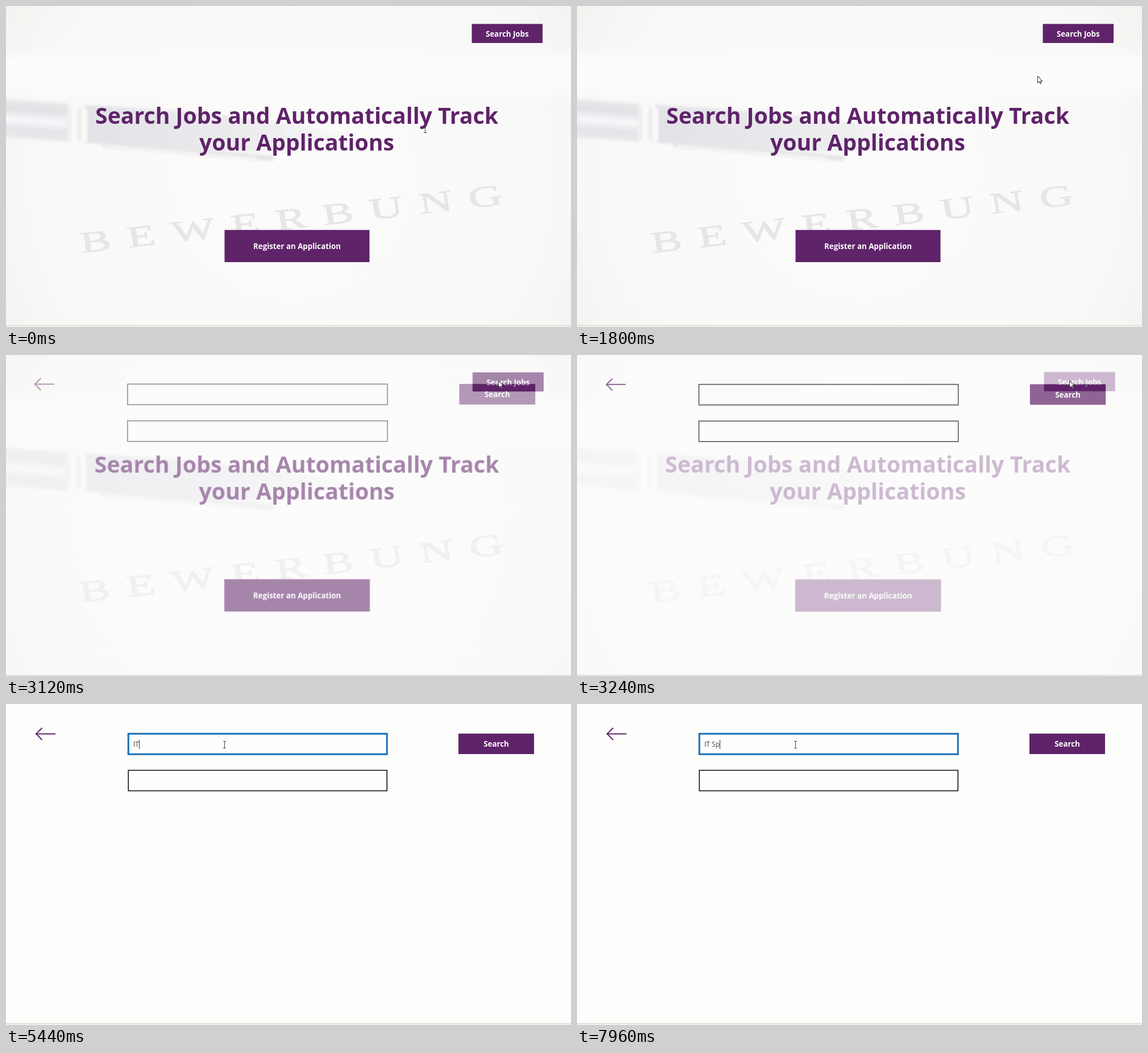
Animation of 994x564 px, one loop 8 s. Source, as an HTML page with a canvas:

```html
<!DOCTYPE html>
<html lang="en">
<head>
<meta charset="utf-8">
<title>Job search</title>
<style>
html, body { margin: 0; width: 100%; height: 100%; overflow: hidden; background: #fdfdfc; }
canvas { display: block; width: 100vw; height: 100vh; }
</style>
</head>
<body>
<canvas id="stage" width="994" height="564"></canvas>
<script>
const W = 994, H = 564, LOOP = 8000;
const PURPLE = '#5f2369', SANS = '"Open Sans", "Noto Sans", sans-serif';
const CLICK = 4160, STROKES = 'IT Sep<<p'; // "<" deletes one letter
const stage = document.getElementById('stage').getContext('2d');

// pointer moves: start, duration, shift in x and y
const MOVES = [
  [80, 800, -332, 57], [1000, 760, 405, -150], [1900, 400, 56, -78],
  [3420, 340, -461, 19], [3800, 320, -21, 7]
];

const clamp = v => Math.max(0, Math.min(1, v));
const ease = v => { const u = clamp(v); return u * u * (3 - 2 * u); };

function write(c, str, x, y, size, color, weight, align = 'center') {
  c.font = `${weight} ${size}px ${SANS}`;
  c.textAlign = align;
  c.fillStyle = color;
  c.fillText(str, x, y);
}

function rect(c, color, x, y, w, h) {
  c.fillStyle = color;
  c.fillRect(x, y, w, h);
}

function button(c, label, x, y, w, h) {
  rect(c, PURPLE, x, y, w, h);
  write(c, label, x + w / 2, y + h / 2 + 5.3, 13.3, '#fff', 700);
}

function fade(c, x0, y0, x1, y1, ...colors) {
  const g = c.createLinearGradient(x0, y0, x1, y1);
  colors.forEach((color, i) => g.addColorStop(i / (colors.length - 1), color));
  return g;
}

function line(c, color, width, ...points) {
  c.strokeStyle = color;
  c.lineWidth = width;
  c.beginPath();
  for (let i = 0; i < points.length; i += 2) c.lineTo(points[i], points[i + 1]);
  c.stroke();
}

function bottomEdge(c) {
  rect(c, '#efefeb', 0, 560, W, 4);
  rect(c, '#dfdfd9', 0, 561, W, 1);
}

// Blurred pen; the skew makes its axis horizontal.
function pen(c) {
  c.save();
  c.transform(1, .07, 0, 1, 0, 198);
  c.filter = 'blur(2px)';
  rect(c, fade(c, 0, -34, 0, 34, '#e8e8e9', '#e2e2e6', '#f8f8fb', '#e4e4e9', '#ebebed'), -10, -34, 120, 67);
  c.fillStyle = fade(c, 140, 0, 650, 0, '#e3e3e7', '#e8e8ec', '#efeff1', 'rgba(246,246,247,0)');
  c.beginPath();
  c.moveTo(138, -34);
  c.quadraticCurveTo(500, -40, 650, -6);
  c.quadraticCurveTo(500, 40, 138, 32);
  c.fill();
  for (let i = 0; i < 4; i++) rect(c, i % 2 ? '#fafaf9' : '#eeeeec', 107 + 9 * i, -28, 9, 58);
  line(c, '#e6e6e7', 10, 170, 33, 470, 37);
  line(c, '#f8f8f5', 4, 175, 36, 440, 40);
  c.restore();
}

function makeHome() {
  const canvas = document.createElement('canvas');
  canvas.width = W;
  canvas.height = H;
  const c = canvas.getContext('2d');
  const glow = c.createRadialGradient(500, 300, 120, 500, 300, 620);
  glow.addColorStop(0, '#fbfbfa');
  glow.addColorStop(.7, '#f8f8f7');
  glow.addColorStop(1, '#f1f1ee');
  rect(c, glow, 0, 0, W, H);
  rect(c, fade(c, 0, 70, 0, 170, 'rgba(252,252,251,0)', '#fcfcfb', '#fcfcfb', 'rgba(252,252,251,0)'), 0, 70, W, 100);
  pen(c);

  c.save();
  c.transform(1.56, -.179, .16, 1, 133, 434);
  c.font = '52px "Liberation Serif", serif';
  c.letterSpacing = '18.3px';
  c.fillStyle = c.strokeStyle = '#e6e6e5';
  c.fillText('BEWERBUNG', 0, 0);
  c.strokeText('BEWERBUNG', 0, 0);
  c.restore();

  bottomEdge(c);
  write(c, 'Search Jobs and Automatically Track', 511.5, 207, 39.2, PURPLE, 700);
  write(c, 'your Applications', 511.5, 254, 39.2, PURPLE, 700);
  button(c, 'Search Jobs', 819.5, 31.5, 124.5, 33.5);
  button(c, 'Register an Application', 384.5, 393.5, 255, 56.5);
  return canvas;
}

function field(c, y, color, width) {
  c.strokeStyle = color;
  c.lineWidth = width;
  c.strokeRect(215.25, y, 455, 36);
}

// An even slowing-down run of keys, then a quick correction.
const strokeTime = i => i < 5 ? 4960 + 1240 * (i / 4) ** .7 : 7600 + 120 * (i - 5);

function typed(t) {
  let str = '', since = CLICK;
  [...STROKES].forEach((key, i) => {
    if (t < strokeTime(i)) return;
    str = key === '<' ? str.slice(0, -1) : str + key;
    since = strokeTime(i);
  });
  return { str, since };
}

function drawForm(c, t, p) {
  rect(c, '#fdfdfc', 0, 0, W, H);
  bottomEdge(c);
  line(c, PURPLE, 2, 52, 52.5, 87, 52.5);
  line(c, PURPLE, 2, 63.5, 42, 53, 52.5, 63.5, 63);
  button(c, 'Search', 796, 52, 133, 36);

  const focused = t >= CLICK;
  field(c, 52.25, focused ? '#1a6fb5' : overField(p) ? '#2e78b8' : '#111', focused ? 3 : 1.6);
  field(c, 116.5, '#111', 1.6);
  if (!focused) return;
  const { str, since } = typed(t);
  write(c, str, 224, 75, 12, '#444', 400, 'left');
  if ((t - since) % 1000 < 500) rect(c, '#333', Math.round(224 + c.measureText(str).width), 63, 1, 16);
}

function pointerAt(t) {
  const p = { x: 737, y: 216 };
  for (const [start, duration, dx, dy] of MOVES) {
    const e = ease((t - start) / duration);
    p.x += dx * e;
    p.y += dy * e;
  }
  return p;
}

const inside = (p, x0, y0, x1, y1) => p.x > x0 && p.x < x1 && p.y > y0 && p.y < y1;
const overField = p => inside(p, 215, 52, 670, 88);
const overTitle = p => inside(p, 150, 168, 872, 268);

function drawPointer(c, p, beam) {
  c.save();
  c.translate(Math.round(p.x), Math.round(p.y));
  if (beam) {
    line(c, '#444', 1, .5, -5, .5, 6);
    for (const y of [-5.5, 6.5]) line(c, '#444', 1, -2, y, 3, y);
  } else {
    line(c, '#333', 1, .5, 0, .5, 12, 3.2, 9.6, 5, 13.6, 6.8, 12.8, 5, 9, 8.6, 9, .5, 0);
    c.fillStyle = '#fff';
    c.fill();
    c.stroke();
  }
  c.restore();
}

function zoomed(c, scale, paint) {
  c.save();
  c.translate(W / 2, H / 2);
  c.scale(scale, scale);
  c.translate(-W / 2, -H / 2);
  paint();
  c.restore();
}

const home = makeHome();

function draw(t) {
  const c = stage, p = pointerAt(t), mix = clamp((t - 2900) / 490);
  if (mix > 0) zoomed(c, 1 + .009 * (1 - mix), () => drawForm(c, t, p));
  if (mix < 1) zoomed(c, 1 + .009 * mix, () => {
    c.globalAlpha = 1 - mix;
    c.drawImage(home, 0, 0);
  });
  drawPointer(c, p, mix < .5 ? overTitle(p) : overField(p));
}

function tick() {
  draw(performance.now() % LOOP);
  requestAnimationFrame(tick);
}
tick();
</script>
</body>
</html>
```
